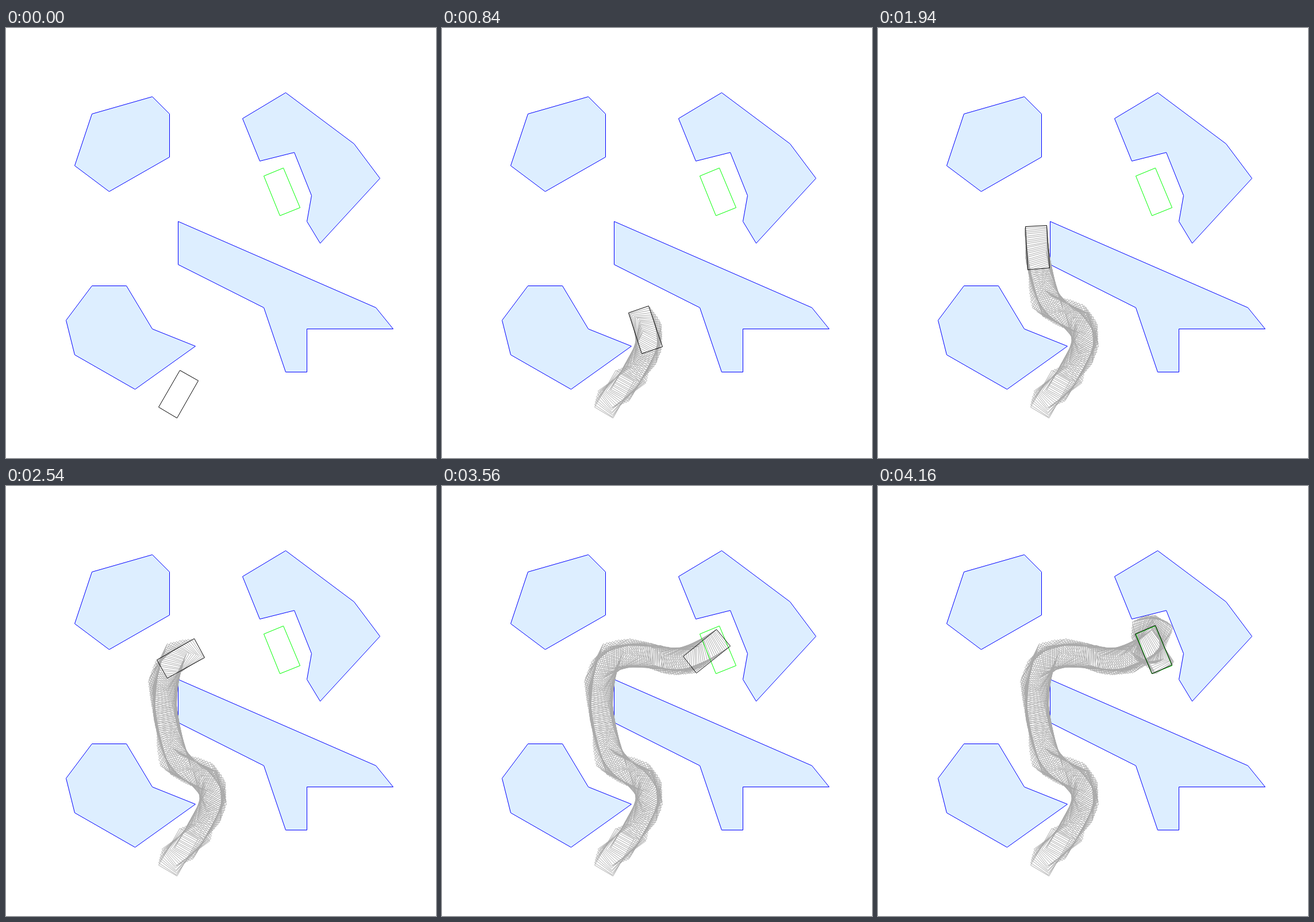
An HTML page with a canvas for the animation above (4.76 s loop, 748x748 px).

```html
<!DOCTYPE html>
<html lang="en">
<head>
<meta charset="utf-8">
<title>Rectangle path planning</title>
<style>
  html, body { margin: 0; width: 100%; height: 100%; overflow: hidden; background: #fff; }
  canvas { display: block; }
</style>
</head>
<body>
<canvas id="stage" width="748" height="748"></canvas>
<script>
const SIZE = 748, LOOP = 4760, STEP = 20, STEPS = 208;
const UNIT = SIZE / 100, HALF_W = 2.5 * UNIT, HALF_L = 5 * UNIT;
const TURN_COST = 0.8; // pixels of travel that take as long as one degree of turning
const ctx = document.getElementById('stage').getContext('2d');

// Obstacle corners on a 100 x 100 grid
const obstacles = [
  '16,32 20,20 34,16 38,20 38,30 24,38',
  '55,21 65,15 81,27 87,35 73,50 70,45 71,39 67,29 59,31',
  '40,45 86,65 90,70 70,70 70,80 65,80 60,65 40,55',
  '20,60 28,60 34,70 44,74 30,84 16,76 14,68'
].map(poly => poly.split(' ').map(p => p.split(',').map(v => Math.floor(v * UNIT))));

// Waypoints: centre x, centre y, heading in degrees clockwise from up
const path = [
  [299.6, 636.4, 30], [313, 623.5, 54], [326.5, 607.5, 30], [348, 569.5, 28],
  [356.5, 547, 8], [353, 523.4, -19.6], [326.5, 498.5, -65], [309, 489, -58],
  [292.4, 460.4, -19.4], [284.8, 431.5, -16], [276.7, 383.6, -4.2], [280.5, 316, 26],
  [303.7, 299.7, 61.2], [328.5, 295, 86], [367, 297, 97], [396, 300, 95],
  [415, 300, 82], [430, 295.7, 66], [459.7, 287, 51.2], [476.5, 266, 34],
  [469.5, 268, -14], [477, 284.5, -35], [479, 284.1, -22.5]
];
const goal = [479.3, 284.6, -22.5];

// Steady pace: each leg lasts as long as its travel or its turn needs
const cost = (a, b) =>
  Math.max(Math.hypot(b[0] - a[0], b[1] - a[1]), TURN_COST * Math.abs(b[2] - a[2]));
const reached = [0];
for (let i = 1; i < path.length; i++) {
  reached.push(reached[i - 1] + cost(path[i - 1], path[i]));
}

function poseAt(progress) {
  const s = progress * reached.at(-1);
  const i = Math.max(1, reached.findIndex(r => r >= s));
  const f = (s - reached[i - 1]) / (reached[i] - reached[i - 1]);
  return path[i].map((v, n) => path[i - 1][n] + (v - path[i - 1][n]) * f);
}

function corners([x, y, deg]) {
  const r = deg * Math.PI / 180, s = Math.sin(r), c = Math.cos(r);
  return [[-1, 1], [1, 1], [1, -1], [-1, -1]].map(([side, end]) => [
    Math.round(x + side * HALF_W * c + end * HALF_L * s),
    Math.round(y + side * HALF_W * s - end * HALF_L * c)
  ]);
}

function outline(points, stroke, fill) {
  ctx.beginPath();
  points.forEach(p => ctx.lineTo(...p));
  ctx.closePath();
  if (fill) {
    ctx.fillStyle = fill;
    ctx.fill();
  }
  ctx.strokeStyle = stroke;
  ctx.stroke();
}

const boxes = Array.from({ length: STEPS + 1 }, (_, i) => corners(poseAt(i / STEPS)));
const goalBox = corners(goal);

function draw(step) {
  ctx.setTransform(1, 0, 0, 1, 0, 0);
  ctx.fillStyle = '#fff';
  ctx.fillRect(0, 0, SIZE, SIZE);
  ctx.translate(0.5, 0.5);
  obstacles.forEach(poly => outline(poly, '#00f', '#def'));
  boxes.slice(0, step).forEach(box => outline(box, '#aaa'));
  outline(goalBox, '#0f0');
  outline(boxes[step], '#000');
}

const start = performance.now();
function tick() {
  const t = (performance.now() - start) % LOOP;
  draw(Math.min(STEPS, Math.floor(t / STEP)));
  requestAnimationFrame(tick);
}
tick();
</script>
</body>
</html>
```
